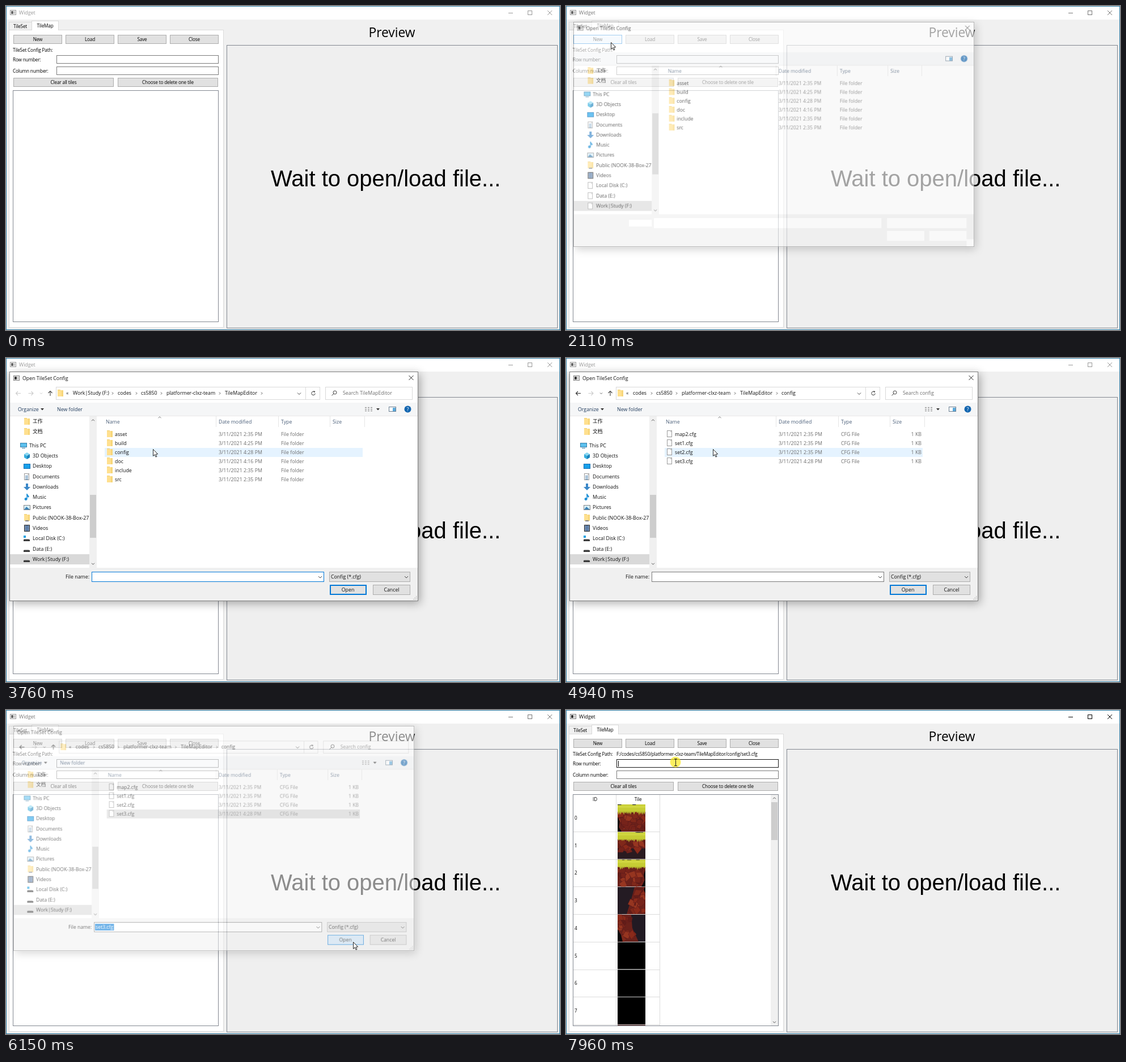
An HTML page with a canvas for the animation above (8 s loop, 977 by 573 pixels).

```html
<!DOCTYPE html>
<html lang="en">
<head>
<meta charset="utf-8">
<title>Widget</title>
<style>
html, body { margin: 0; width: 100%; height: 100%; overflow: hidden; background: #f0f0f0; }
canvas { display: block; }
</style>
</head>
<body>
<canvas id="stage" width="977" height="573"></canvas>
<script>
const LOOP = 8000;
const UI = '"Open Sans", "Noto Sans", "Noto Sans CJK SC", "Noto Sans CJK", sans-serif';
const screen = document.getElementById('stage').getContext('2d');
const layer = (w, h) => {
  const c = document.createElement('canvas');
  c.width = w;
  c.height = h;
  return c.getContext('2d');
};
const dialogLayer = layer(721, 406);
const tileLayer = layer(50, 391);
let g = screen;

// ---------- drawing helpers ----------
function fill(x, y, w, h, color) {
  g.fillStyle = color;
  g.fillRect(x, y, w, h);
}
function box(x0, y0, x1, y1, inside, edge, line = 1) {
  fill(x0, y0, x1 - x0, y1 - y0, edge);
  fill(x0 + line, y0 + line, x1 - x0 - 2 * line, y1 - y0 - 2 * line, inside);
}
function path(points, color, width, closed) {
  g.beginPath();
  for (let i = 0; i < points.length; i += 2) g.lineTo(points[i], points[i + 1]);
  if (closed) g.closePath();
  if (width) {
    g.strokeStyle = color;
    g.lineWidth = width;
    g.stroke();
  } else {
    g.fillStyle = color;
    g.fill();
  }
}
function disc(x, y, r, color) {
  g.fillStyle = color;
  g.beginPath();
  g.arc(x, y, r, 0, 7);
  g.fill();
}
function write(s, x, y, color, size, align = 'left', spacing = 0) {
  g.font = size + 'px ' + UI;
  g.letterSpacing = spacing + 'px';
  g.textAlign = align;
  g.fillStyle = color;
  g.fillText(s, x, y + 3);
}
const label = (s, x, y, align) => write(s, x, y, '#000', 8.2, align, -0.16);
const text = (s, x, y, color = '#111', align) => write(s, x, y, color, 8.8, align);

// dir: 0 right, 1 down, 2 left, 3 up
function chevron(x, y, dir, r = 2, color = '#555') {
  g.save();
  g.translate(x, y);
  g.rotate(dir * Math.PI / 2);
  path([-r / 2, -r, r / 2, 0, -r / 2, r], color, 1);
  g.restore();
}
function arrow(x, y, dir, color) {
  g.save();
  g.translate(x, y);
  g.rotate(dir * Math.PI / 2);
  path([-4.5, 0, 4, 0], color, 1.1);
  path([0.5, -3.5, 4, 0, 0.5, 3.5], color, 1.1);
  g.restore();
}
const caretDown = (x, y) => path([x - 3, y - 1.5, x + 3, y - 1.5, x, y + 2], '#333');
function cross(x, y, r, color) {
  path([x - r, y - r, x + r, y + r], color, 1);
  path([x + r, y - r, x - r, y + r], color, 1);
}
function appIcon(x, y, soft) {
  box(x, y, x + 11, y + 9, '#fff', soft ? '#999' : '#777');
  fill(x + 2, y + 2, 4, 5, soft ? '#666' : '#333');
  fill(x + 7, y + 2, 2, 5, '#bbb');
}

// ---------- timeline ----------
// start, end, number of jumps, target x, target y
const MOVES = [
  [390, 390, 1, 417, 417], [610, 1390, 9, 78, 78], [1590, 1590, 1, 79, 64],
  [2490, 2490, 1, 303, 224], [2580, 2580, 1, 290, 210], [2890, 3170, 4, 264, 166],
  [3380, 3470, 2, 259, 161], [5050, 5160, 2, 259, 179], [5450, 5950, 6, 612, 410],
  [6650, 7160, 6, 248, 200], [7450, 7760, 4, 193, 92]
];
const CLICKS = [[1890, 2110], [2200, 2490], [4260, 4560], [5350, 5450], [6050, 6150], [7858, 8000]];
const between = (t, a, b) => t >= a && t < b;

function pointer(t) {
  let x = 491, y = 496;
  for (const [t0, t1, n, tx, ty] of MOVES) {
    if (t < t0) break;
    const gap = (t1 - t0) / Math.max(1, n - 1);
    const u = gap ? Math.min(1, (Math.floor((t - t0) / gap + 0.01) + 1) / n) : 1;
    const e = u * u * (3 - 2 * u);
    x += (tx - x) * e;
    y += (ty - y) * e;
  }
  return { x: Math.round(x), y: Math.round(y) };
}
const over = (p, x0, y0, x1, y1) => p.x >= x0 && p.x < x1 && p.y >= y0 && p.y < y1;

// ---------- tiles ----------
function paintTiles() {
  let seed = 11;
  const rnd = () => (seed = (seed * 16807) % 2147483647) / 2147483647;
  const reds = ['#8a2a1a', '#76231a', '#963520', '#641d18', '#80281a'];
  const rocks = (n, u0, u1, v0, v1) => {
    for (let i = 0; i < n; i++) {
      const x = u0 + rnd() * (u1 - u0), y = v0 + rnd() * (v1 - v0);
      const r = 4 + rnd() * 5, spin = rnd() * 6, pts = [];
      for (let k = 0; k < 4; k++) {
        const a = spin + k * 1.571, q = r * (0.6 + rnd() * 0.7);
        pts.push(x + Math.cos(a) * q, y + Math.sin(a) * q);
      }
      path(pts, reds[Math.floor(rnd() * 5)], 0, true);
      path(pts, '#56181a', 0.5, true);
    }
  };
  const grass = () => {
    fill(0, 0, 49, 13, '#c6cc34');
    fill(0, 2, 49, 4, '#d0d640');
    for (let x = 0; x < 49; x += 3) {
      const d = 2 + rnd() * 5;
      path([x, 12, x + 4, 12, x + 2, 12 + d], '#bcc130');
    }
    for (let i = 0; i < 3; i++) fill(rnd() * 44, 0, 3 + rnd() * 6, 1, '#111');
  };
  const edge = (pts) => path(pts, '#0b080a');
  const paint = [
    () => { fill(0, 0, 49, 48, '#6b211a'); rocks(26, 3, 46, 16, 45); edge([0, 22, 4, 30, 2, 40, 7, 48, 0, 48]); grass(); },
    () => { fill(0, 0, 49, 48, '#2a1a20'); fill(0, 0, 49, 29, '#6b211a'); rocks(20, 3, 46, 16, 33); grass(); },
    () => { fill(0, 0, 49, 48, '#6b211a'); rocks(26, 3, 43, 16, 45); edge([49, 18, 46, 27, 48, 36, 42, 48, 49, 48]); grass(); },
    () => { fill(0, 0, 49, 48, '#241b23'); path([30, 0, 49, 0, 49, 48, 16, 48, 24, 22], '#6b211a'); rocks(9, 33, 47, 3, 22); rocks(12, 24, 47, 23, 46); edge([49, 0, 46, 4, 49, 12]); },
    () => { fill(0, 0, 49, 48, '#211a23'); path([0, 0, 24, 0, 26, 24, 37, 48, 0, 48], '#6b211a'); rocks(12, 3, 22, 3, 27); rocks(10, 8, 31, 29, 46); edge([0, 26, 6, 36, 9, 48, 0, 48]); }
  ];
  g = tileLayer;
  for (let i = 0; i < 9; i++) {
    g.save();
    g.translate(0, i * 48.7);
    g.beginPath();
    g.rect(0, 0, 49, 48);
    g.clip();
    if (paint[i]) paint[i]();
    else fill(0, 0, 49, 48, i < 8 ? '#000' : '#4a1a18');
    g.restore();
  }
  g = screen;
}

// ---------- main window ----------
function button(s, x0, x1, y0, hot) {
  box(x0, y0, x1, y0 + 16, hot ? '#e5f1fb' : '#e1e1e1', hot ? '#0078d7' : '#adadad');
  label(s, (x0 + x1) / 2, y0 + 8, 'center');
}
function tileTable() {
  label('ID', 51, 158, 'center');
  label('Tile', 127, 158, 'center');
  fill(88, 150, 1, 408, '#dcdcdc');
  fill(165, 150, 1, 408, '#dcdcdc');
  for (let i = 0; i < 8; i++) {
    fill(13, Math.round(215 + i * 48.7), 152, 1, '#dcdcdc');
    label(String(i), 15, 191 + i * 48.7);
  }
  g.drawImage(tileLayer.canvas, 91, 167);
  fill(361, 150, 13, 408, '#f0f0f0');
  fill(362, 163, 11, 67, '#cdcdcd');
  chevron(367.5, 156, 3, 2.5);
  chevron(367.5, 552, 1, 2.5);
}
function mainWindow(t, p) {
  const active = between(t, 1690, 2110) || t >= 6260;
  const turning = between(t, 2110, 2200) || between(t, 6150, 6260);
  const ink = active ? '#000' : turning ? '#777' : '#999';
  const loaded = t >= 6260;
  box(0, 0, 977, 573, '#f0f0f0', '#2f7fa8');
  fill(1, 1, 975, 23, '#fff');
  appIcon(7, 7, !active);
  text('Widget', 23, 12, ink);
  fill(886, 12, 8, 1, ink);
  box(920, 8, 928, 16, '#fff', ink);
  cross(959, 12, 4, ink);

  box(5, 42, 384, 569, '#fff', '#dcdcdc');
  box(5, 28, 46, 43, '#f0f0f0', '#d9d9d9');
  box(45, 26, 93, 43, '#fff', '#d9d9d9');
  fill(46, 41, 46, 3, '#fff');
  label('TileSet', 25, 36, 'center');
  label('TileMap', 69, 35, 'center');
  const onNew = t >= 1590 && t < 2490 && over(p, 13, 51, 99, 67);
  button('New', 13, 99, 51, onNew);
  button('Load', 105, 191, 51);
  button('Save', 197, 283, 51);
  button('Close', 289, 375, 51);
  label('TileSet Config Path:', 12, 78);
  label('Row number:', 12, 95);
  label('Column number:', 12, 115);
  if (loaded) label('F:/codes/cs5850/platformer-clxz-team/TileMapEditor/config/set3.cfg', 89, 78);
  const hotField = (y) => t > 7400 && over(p, 89, y, 375, y + 15) ? '#171717' : '#7a7a7a';
  box(89, 87, 375, 102, '#fff', hotField(87));
  box(89, 107, 375, 122, '#fff', hotField(107));
  if (t >= 7858) fill(92, 90, 1, 10, '#000');
  button('Clear all tiles', 13, 190, 127);
  button('Choose to delete one tile', 197, 374, 127);
  box(12, 149, 375, 559, '#fff', '#828790');
  if (loaded) tileTable();

  box(389, 69, 973, 570, '#efefef', '#828790');
  write('Preview', 680.5, 52, '#000', 22.8, 'center');
  g.font = '40px "Liberation Sans", Arial, sans-serif';
  g.textAlign = 'left';
  g.fillText('Wait to open/load file...', 467, 319);
}

// ---------- file dialog ----------
function folder(x, y) {
  fill(x, y - 6, 5, 3, '#f0cf72');
  fill(x, y - 5, 10, 11, '#ffe08f');
  fill(x + 7, y - 5, 3, 11, '#f7d67a');
}
function page(x, y, lined) {
  box(x, y - 6, x + 9, y + 6, '#fff', '#9a9a9a');
  path([x + 6, y - 6, x + 9, y - 3, x + 6, y - 3], '#c8c8c8');
  if (lined) for (let k = -2; k < 5; k += 2) fill(x + 2, y + k, 5, 1, '#5d8fb8');
}
function drive(x, y) {
  path([x + 1, y + 1, x + 9, y + 1, x + 11, y + 3, x, y + 3], '#9a9a9a');
  fill(x, y + 2, 11, 3, '#3b3b3b');
}
const ICONS = {
  folder: (x, y) => folder(x + 1, y),
  pc: (x, y) => { box(x, y - 5, x + 12, y + 3, '#5cc0ee', '#3a7fa8'); fill(x + 3, y + 4, 6, 1, '#3a7fa8'); },
  cube: (x, y) => {
    path([x + 6, y - 6, x + 11, y - 3, x + 6, y, x + 1, y - 3], '#8bd8f2');
    path([x + 1, y - 3, x + 6, y, x + 6, y + 6, x + 1, y + 3], '#35aede');
    path([x + 11, y - 3, x + 6, y, x + 6, y + 6, x + 11, y + 3], '#1b84bd');
  },
  desktop: (x, y) => box(x, y - 4, x + 12, y + 5, '#18a0ea', '#0c6cb3'),
  docs: (x, y) => page(x + 1, y, true),
  down: (x, y) => path([x + 4, y - 6, x + 8, y - 6, x + 8, y, x + 12, y, x + 6, y + 6, x, y, x + 4, y], '#3a87c8'),
  music: (x, y) => {
    disc(x + 4, y + 3.5, 2.4, '#1d8fd6');
    fill(x + 5.2, y - 6, 1.4, 10, '#1d8fd6');
    path([x + 6, y - 6, x + 10, y - 1, x + 8, y + 1, x + 6, y - 2], '#1d8fd6');
  },
  pictures: (x, y) => {
    box(x, y - 4, x + 12, y + 5, '#d9effa', '#888');
    path([x + 1, y + 4, x + 5, y - 1, x + 11, y + 4], '#3c83b5');
  },
  shared: (x, y) => { folder(x + 1, y - 1); fill(x + 3, y + 4, 6, 2, '#8a8a8a'); },
  videos: (x, y) => {
    box(x + 1, y - 6, x + 11, y + 6, '#5f7fa8', '#222');
    for (let k = -5; k < 6; k += 3) { fill(x + 2, y + k, 1, 1, '#ddd'); fill(x + 9, y + k, 1, 1, '#ddd'); }
  },
  system: (x, y) => { drive(x, y); fill(x, y - 5, 4, 4, '#1ba1e2'); },
  drive
};
const PLACES = [
  ['folder', '工作', 112], ['folder', '文档', 130], ['pc', 'This PC', 154.5], ['cube', '3D Objects', 173],
  ['desktop', 'Desktop', 191], ['docs', 'Documents', 209.5], ['down', 'Downloads', 228],
  ['music', 'Music', 246], ['pictures', 'Pictures', 264], ['shared', 'Public (NOOK-38-Box-27', 282.5],
  ['videos', 'Videos', 301], ['system', 'Local Disk (C:)', 319], ['drive', 'Data (E:)', 337.5],
  ['drive', 'Work|Study (F:)', 356]
];
const FOLDERS = [['asset', '2:35'], ['build', '4:25'], ['config', '4:28'], ['doc', '4:16'], ['include', '2:35'], ['src', '2:35']];
const FILES = [['map2.cfg', '2:35'], ['set1.cfg', '2:35'], ['set2.cfg', '2:35'], ['set3.cfg', '4:28']];
const ROOT_PATH = [['Work|Study (F:)', 118, 188], ['codes', 197, 230], ['cs5850', 238, 274],
  ['platformer-clxz-team', 283, 377], ['TileMapEditor', 386, 451]];
const CONFIG_PATH = [['codes', 118, 151], ['cs5850', 159, 195], ['platformer-clxz-team', 204, 298],
  ['TileMapEditor', 307, 372], ['config', 380, 0]];

function addressRow(inside) {
  arrow(21.5, 62.5, 2, inside ? '#333' : '#ccc');
  arrow(44, 62.5, 0, '#ccc');
  chevron(62, 62.5, 1, 2, inside ? '#666' : '#ccc');
  arrow(78, 62.5, 3, '#444');
  box(88, 51, 554, 74, '#fff', '#d9d9d9');
  fill(528, 52, 1, 21, '#d9d9d9');
  folder(91, 62);
  text('«', 106, 61.5, '#333');
  for (const [s, x, sep] of inside ? CONFIG_PATH : ROOT_PATH) {
    text(s, x, 62);
    if (sep) chevron(sep, 62.5, 0);
  }
  chevron(517, 63, 1, 3, '#444');
  g.strokeStyle = '#444';
  g.lineWidth = 1;
  g.beginPath();
  g.arc(542, 62.5, 3.2, 0, 5);
  g.stroke();
  path([542, 58, 545.5, 59, 543.5, 61.5], '#444');
  box(563, 51, 717, 74, '#fff', '#d9d9d9');
  g.beginPath();
  g.arc(580, 61, 3, 0, 7);
  g.stroke();
  path([578, 63, 574.5, 66.5], '#444', 1);
  text(inside ? 'Search config' : 'Search TileMapEditor', 594, 62, '#6d6d6d');
}
function toolbar(ready) {
  fill(7, 79, 719, 23, '#f5f6f7');
  fill(7, 102, 719, 1, '#e8e8e8');
  if (ready) {
    text('Organize', 21, 90.5, '#1e395b');
    caretDown(64, 90.5);
    text('New folder', 90, 90.5, '#1e395b');
    for (let r = 0; r < 3; r++) {
      for (let c = 0; c < 3; c++) fill(633 + c * 5, 87 + r * 3, 3, 1, '#777');
    }
    caretDown(656, 90.5);
  }
  box(675, 86, 688, 95, '#fff', '#6b7f93');
  fill(682, 88, 5, 6, '#5aa9dc');
  disc(708.5, 90.5, 6, '#1366b0');
  write('?', 708.5, 90.5, '#fff', 9.5, 'center');
}
function sidebar(ready) {
  fill(7, 347, 140, 18, '#d9d9d9');
  g.save();
  g.beginPath();
  g.rect(7, 103, 140, 268);
  g.clip();
  for (const [kind, s, y] of PLACES) {
    const x = kind === 'pc' ? 25 : 31;
    if (!ready && (kind === 'drive' || kind === 'system')) page(x + 1, y);
    else ICONS[kind](x, Math.round(y));
    text(s, x + 16, y);
  }
  g.restore();
  fill(147, 103, 13, 268, '#f0f0f0');
  if (ready) fill(148, 242, 11, 76, '#cdcdcd');
  else fill(148, 189, 11, 110, '#cdcdcd');
  chevron(153.5, 110, 3, 2.5);
  chevron(153.5, 364, 1, 2.5);
}
function fileList(t, p, inside) {
  const rows = inside ? FILES : FOLDERS;
  const gray = '#6d6d6d';
  const hot = t >= 2490 && !between(t, 4350, 4850) && over(p, 174, 127, 629, 800)
    ? Math.floor((p.y - 127) / 16) : -1;
  [370, 480, 571, 632].forEach((x) => fill(x, 103, 1, 19, '#e5e5e5'));
  text('Name', 176, 113, '#4c607a');
  text('Date modified', 375, 113, '#4c607a');
  text('Type', 485, 113, '#4c607a');
  text('Size', 576, 113, '#4c607a');
  chevron(271, 105, 3, 2.5, '#777');
  rows.forEach(([name, time], i) => {
    const y = 135 + i * 16;
    const picked = inside && i === 3 && t >= 5350;
    if (picked) fill(174, y - 8, 455, 16, t >= 6050 ? '#d9d9d9' : '#cce8ff');
    else if (i === hot) fill(174, y - 8, 455, 16, '#e5f3ff');
    if (inside) page(178, y - 1);
    else folder(178, y - 1);
    text(name, 192, y);
    text('3/11/2021 ' + time + ' PM', 375, y, gray);
    text(inside ? 'CFG File' : 'File folder', 485, y, gray);
    if (inside) text('1 KB', 627, y, gray, 'right');
  });
}
function footer(t, p, ready, inside) {
  fill(7, 371, 719, 58, '#f0f0f0');
  if (!ready) {
    [[106, 381, 41, 12], [151, 378, 409, 18], [570, 378, 143, 18], [570, 401, 67, 18], [646, 401, 67, 18], [713, 416, 13, 13]]
      .forEach(([x, y, w, h]) => fill(x, y, w, h, '#fff'));
    return;
  }
  text('File name:', 147, 387, '#111', 'right');
  box(151, 378, 561, 396, '#fff', inside ? '#7a7a7a' : '#0078d7');
  chevron(554, 387.5, 1, 3, '#444');
  const caret = between(t, 2290, 2890) || between(t, 3380, 3760);
  if (caret && !inside) fill(154, 381, 1, 12, '#000');
  if (t >= 5350) {
    if (t >= 6050) fill(153, 381, 34, 12, '#0078d7');
    text('set3.cfg', 154, 387, t >= 6050 ? '#fff' : '#111');
  }
  box(570, 378, 713, 396, '#e1e1e1', '#adadad');
  text('Config (*.cfg)', 573, 387);
  chevron(706, 387.5, 1, 3, '#444');
  box(571, 401, 636, 419, over(p, 571, 401, 636, 419) ? '#cce4f7' : '#e1e1e1', '#0078d7', t >= 6050 ? 1 : 2);
  text('Open', 603, 410, '#111', 'center');
  box(647, 401, 713, 419, '#e1e1e1', '#adadad');
  text('Cancel', 680, 410, '#111', 'center');
  for (let k = 0; k < 3; k++) {
    for (let j = 0; j <= k; j++) fill(723 - j * 2.5, 421 + k * 2.5, 1.3, 1.3, '#b5b5b5');
  }
}
function dialog(t, p) {
  if (!between(t, 2110, 6260)) return;
  const ready = t >= 2290;
  const inside = t >= 4350;
  const opening = t < 2200;
  const closing = t >= 6150;
  g = dialogLayer;
  g.save();
  g.translate(-6, -24);
  box(6, 24, 727, 430, '#fff', '#7d7d7d');
  if (!closing) {
    appIcon(13, 31, false);
    cross(714.5, 35, 4, '#222');
  }
  text('Open TileSet Config', closing ? 13 : 29, 35.5);
  if (ready) addressRow(inside);
  toolbar(ready);
  sidebar(ready);
  fileList(t, p, inside);
  footer(t, p, ready, inside);
  g.restore();

  g = screen;
  const scale = opening || closing ? 0.981 : 1;
  g.save();
  g.globalAlpha = opening ? 0.64 : closing ? 0.55 : 1;
  g.translate(366.5, 227);
  g.scale(scale, scale);
  // the shadow falls only outside the dialog, so it never shows through it
  g.save();
  g.beginPath();
  g.rect(-400, -250, 800, 500);
  g.rect(-360.5, -203, 721, 406);
  g.clip('evenodd');
  g.shadowColor = 'rgba(0,0,0,.32)';
  g.shadowBlur = 15;
  g.shadowOffsetX = 3;
  g.shadowOffsetY = 4;
  fill(-360.5, -203, 721, 406, '#fff');
  g.restore();
  g.drawImage(dialogLayer.canvas, -360.5, -203);
  g.restore();
}

// ---------- pointer ----------
function drawPointer(t, p) {
  if (t < 300) return;
  if (CLICKS.some(([a, b]) => between(t, a, b))) disc(p.x, p.y, 9.5, 'rgba(250,232,20,.68)');
  if (t > 7400 && (over(p, 89, 87, 375, 102) || over(p, 89, 107, 375, 122))) {
    const { x, y } = p;
    fill(x, y - 5, 1, 11, '#222');
    fill(x - 2, y - 6, 5, 1, '#222');
    fill(x - 2, y + 6, 5, 1, '#222');
    return;
  }
  const shape = [0, 0, 0, 11.8, 2.7, 9.3, 4.6, 13.6, 6.4, 12.8, 4.6, 8.6, 8.2, 8.4]
    .map((v, i) => v + 0.5 + (i % 2 ? p.y : p.x));
  path(shape, '#fff', 0, true);
  path(shape, '#111', 0.9, true);
}

function frame(now) {
  const t = now % LOOP;
  const p = pointer(t);
  g = screen;
  mainWindow(t, p);
  dialog(t, p);
  drawPointer(t, p);
  requestAnimationFrame(frame);
}
paintTiles();
requestAnimationFrame(frame);
</script>
</body>
</html>
```
